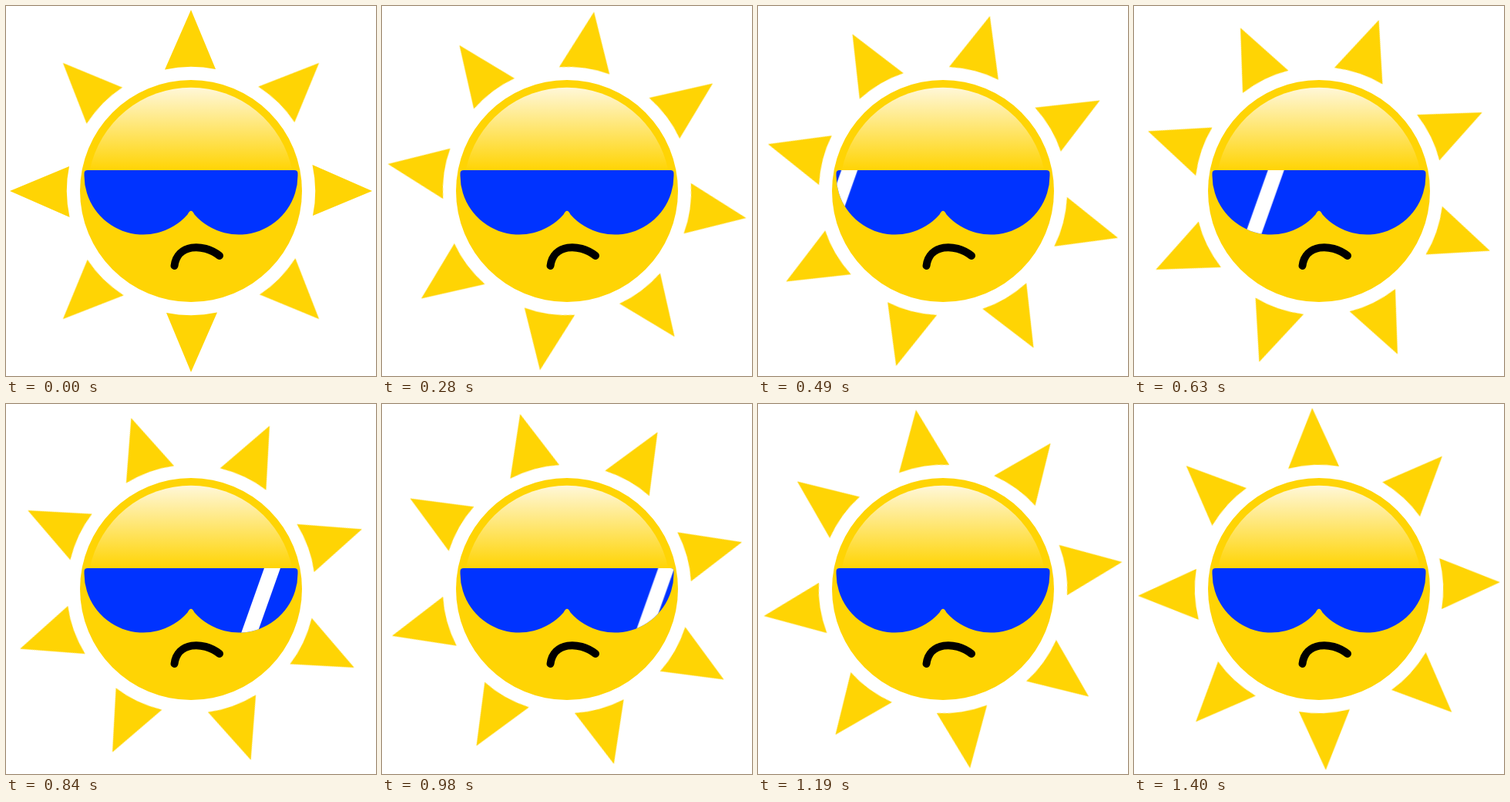
Write an HTML page without scripts that moves like this. It is 480 px wide and 480 px high and loops after 1470 ms.

```html
<!DOCTYPE html>
<html lang="en">
<head>
<meta charset="utf-8">
<title>Sulky sun</title>
<style>
  html, body { margin: 0; width: 100%; height: 100%; overflow: hidden; background: #fff; }
  svg { display: block; width: 100vw; height: 100vh; }
  .sun { fill: #ffd404; }
  .rays { animation: spin 1470ms steps(21) infinite; }
  .glint { fill: #fff; animation: sweep 1470ms infinite; }
  .mouth { fill: none; stroke: #000; stroke-width: 10; stroke-linecap: round; }

  /* One eighth of a turn brings the rays back onto themselves. */
  @keyframes spin { to { transform: rotate(45deg); } }

  /* Slow in, quick across the lenses, slow out. */
  @keyframes sweep {
    0% { transform: translateX(47px); animation-timing-function: steps(8); }
    38.09% { transform: translateX(141px); animation-timing-function: steps(4); }
    57.14% { transform: translateX(356px); animation-timing-function: steps(9); }
    100% { transform: translateX(461px); }
  }
</style>
</head>
<body>
<svg viewBox="0 0 480 480">
  <defs>
    <linearGradient id="shine" x1="0" y1="106" x2="0" y2="213" gradientUnits="userSpaceOnUse">
      <stop offset="0" stop-color="#fff7d8"/>
      <stop offset="1" stop-color="#ffd404"/>
    </linearGradient>
    <path id="ray" d="M0-235 32-158A161.2 161.2 0 0 0-34-157.6Z"/>
    <g id="pair">
      <use href="#ray"/>
      <use href="#ray" transform="rotate(45)"/>
    </g>
    <path id="glasses" d="M106 213H374Q378.5 213 378.5 217V220A76.5 76.5 0 0 1 244.5 270.5Q240 261 235.5 270.5A76.5 76.5 0 0 1 101.5 220V217Q101.5 213 106 213Z"/>
    <clipPath id="lenses"><use href="#glasses"/></clipPath>
  </defs>

  <g class="sun" transform="translate(240 240)">
    <g class="rays">
      <use href="#pair"/>
      <use href="#pair" transform="rotate(90)"/>
      <use href="#pair" transform="rotate(180)"/>
      <use href="#pair" transform="rotate(270)"/>
    </g>
    <circle r="144"/>
  </g>

  <path fill="url(#shine)" d="M108.7 213A134 134 0 0 1 371.3 213Z"/>
  <use href="#glasses" fill="#03f"/>
  <g clip-path="url(#lenses)">
    <path class="glint" d="M1 210H-20L-53 303H-32Z"/>
  </g>
  <path class="mouth" d="M218.5 337C222 309 255 307 277 324"/>
</svg>
</body>
</html>
```
